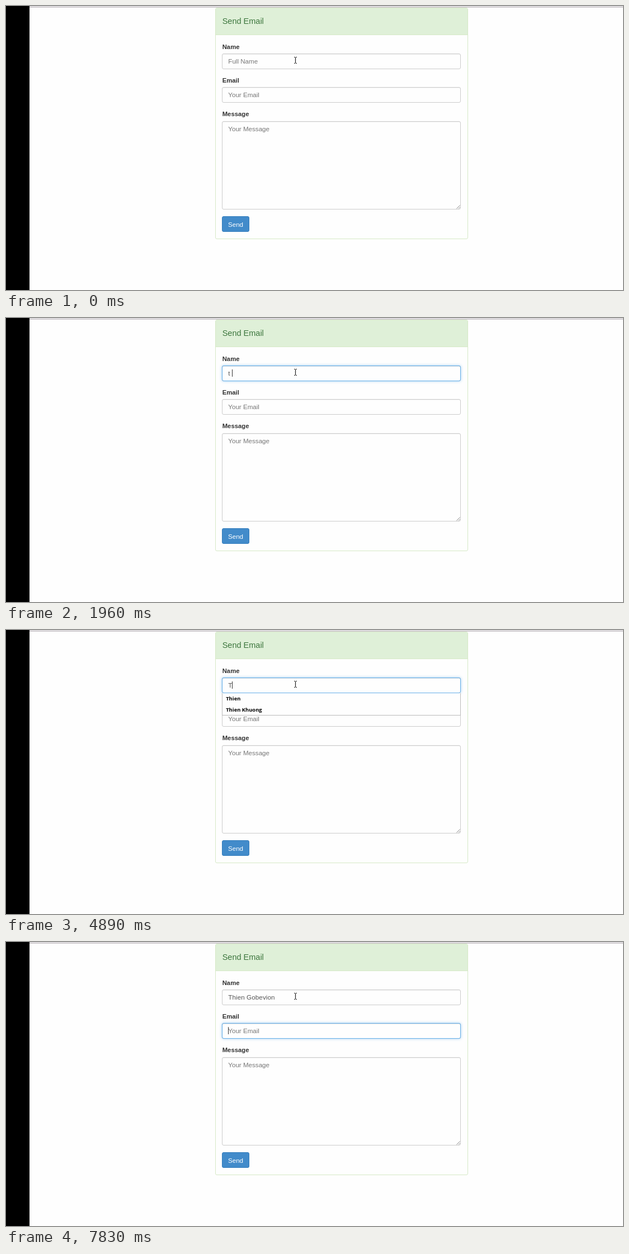
These frames come from a looping animation (1103 px wide and 508 px high, 8 s). An HTML page:

```html
<!DOCTYPE html>
<html lang="en">
<head>
<meta charset="utf-8">
<title>Send Email</title>
<style>
  html, body { margin: 0; width: 100%; height: 100%; overflow: hidden; background: #fefefe; }
  body { position: relative; font: 11.6px "Liberation Sans", Arial, sans-serif; color: #555; }
  div, svg, i { position: absolute; box-sizing: border-box; }
  div { white-space: pre; }
  .bar { left: 0; top: 0; width: 42px; height: 100%; background: #000; }
  .rule { left: 42px; right: 0; top: 1px; height: 2px; background: linear-gradient(#b8b3b8 50%, #dcd9dc 50%); }
  .panel { left: 374px; top: 3px; width: 452px; height: 414px; border: 1px solid #d6e9c6; border-radius: 3px; background: #fefefe; }
  .head { left: 0; right: 0; top: 0; height: 48px; border-bottom: 1px solid #d6e9c6; background: #dff0d8;
    color: #3c763d; font-size: 14.5px; line-height: 46px; padding-left: 11.7px; }
  .label { left: 386.7px; line-height: 14px; font-weight: bold; font-size: 11.3px; color: #333; }
  .field { left: 386px; width: 427px; height: 28px; line-height: 26px; padding-left: 10.3px; letter-spacing: .1px;
    border: 1px solid #ccc; border-radius: 3px; background: #fefefe; box-shadow: inset 0 1px 1px rgba(0,0,0,.06); }
  .glow { inset: -1px; border: 1px solid #66afe9; border-radius: 3px; opacity: 0;
    box-shadow: inset 0 1px 1px rgba(0,0,0,.06), 0 0 5px rgba(102,175,233,.6); }
  .hint { color: #777; letter-spacing: 0; }
  .caret { display: inline-block; position: relative; width: 0; height: 1px; }
  .caret::after { content: ""; position: absolute; left: 0; top: -10px; width: 1px; height: 13px; background: #333; }
  .typo { background:
    repeating-linear-gradient(90deg, #e33 0 1.6px, transparent 1.6px 3.2px) 0 100% / 100% 1px no-repeat,
    repeating-linear-gradient(90deg, transparent 0 1.6px, #e33 1.6px 3.2px) 0 calc(100% - 1px) / 100% 1px no-repeat; }
  .popup { left: 386px; top: 113px; width: 427px; overflow: hidden; background: #fefefe;
    border: 1px solid #bbb; border-top: 0; padding-left: 6.2px; color: #000;
    font: bold 9.4px/19.6px "Open Sans", "Noto Sans", sans-serif; }
  .button { left: 386px; top: 376px; width: 49px; height: 28px; line-height: 27px; text-align: center;
    color: #fff; background: #428bca; border: 1px solid #357ebd; border-radius: 3px; }
  svg { left: 0; top: 0; fill: none; }
</style>
</head>
<body>
<div class="bar"></div>
<div class="rule"></div>
<div class="panel"><div class="head">Send Email</div></div>
<div class="label" style="top:66px">Name</div>
<div class="field" style="top:85px"><div class="glow" id="nameGlow"></div><span id="name"></span></div>
<div class="label" style="top:126px">Email</div>
<div class="field" style="top:145px"><div class="glow" id="mailGlow"></div><span id="mail"></span></div>
<div class="label" style="top:186px">Message</div>
<div class="field" style="top:206px;height:158px"><span class="hint">Your Message</span></div>
<div class="button">Send</div>
<div class="popup" id="popup"></div>
<svg width="1103" height="508">
  <path d="M805.5 362.5l6-6M809 362.5l2.5-2.5" stroke="#888"/>
  <path d="M515 91.5h2m1 0h2M517.5 92v10M515 102.5h2m1 0h2" stroke="#222" stroke-width="1.2"/>
</svg>
<script>
const LOOP = 8000;
const FIRST = "Thien", LAST = "Gobevion", SAVED = [FIRST, FIRST + " Khuong"];
const $ = id => document.getElementById(id);
const OFF = 0, END = 1, START = 2;

// [time, typed text, popup rows, caret]
const steps = [
  [0, "", 0, OFF], [140, "", 0, END], [280, "", 6, END],
  [420, "t", 6, START], [540, "t", 4, START], [660, "t", 2, START],
  [1030, "t", 0, END], [1560, "t", 0, OFF], [1960, "t ", 0, END],
  [2240, "t", 0, END], [2380, "", 0, END], [2760, "t", 2, END],
  [2910, "th", 2, END], [3420, "th", 2, OFF], [3840, "t", 2, END],
  [4000, "", 0, END], [4510, "", 0, OFF]
];
[4890, 5030, 5160, 5290, 5410].forEach((t, i) => steps.push([t, FIRST.slice(0, i + 1), 2, END]));
steps.push([5540, FIRST + " ", 1, END], [5790, FIRST + " ", 0, END]);
[5930, 6060, 6590, 6740, 6860, 7010, 7160, 7300].forEach((t, i) =>
  steps.push([t, FIRST + " " + LAST.slice(0, i + 1), 0, END]));
steps.push([7430, FIRST + " " + LAST + " ", 0, END], [7710, FIRST + " " + LAST + " ", 0, OFF]);

const CARET = '<i class="caret"></i>';
const hint = (text, caret) => (caret ? CARET : "") + `<span class="hint">${text}</span>`;

function put(el, html) {
  if (el.shown !== html) el.innerHTML = el.shown = html;
}

function draw(t) {
  const [, text, rows, caret] = steps.findLast(s => s[0] <= t);
  const marked = t >= 7430 && t < 7710 ? text.replace(LAST, `<span class="typo">${LAST}</span>`) : text;
  put($("name"), text
    ? (caret === START ? CARET : "") + marked + (caret === END ? CARET : "")
    : hint("Full Name", caret));
  put($("mail"), hint("Your Email", t >= 7710));

  const mailFocus = t < 7710 ? 0 : t < 7830 ? 0.5 : 1;
  $("mailGlow").style.opacity = mailFocus;
  $("nameGlow").style.opacity = t < 140 ? 0 : 1 - mailFocus;

  const popup = $("popup");
  popup.style.display = rows ? "block" : "none";
  popup.style.height = 1 + 19.7 * rows + "px";
  put(popup, (rows === 1 ? SAVED.slice(1) : SAVED).join("\n"));
}

let begin;
function tick(now) {
  begin ??= now;
  draw((now - begin) % LOOP);
  requestAnimationFrame(tick);
}
draw(0);
requestAnimationFrame(tick);
</script>
</body>
</html>
```
